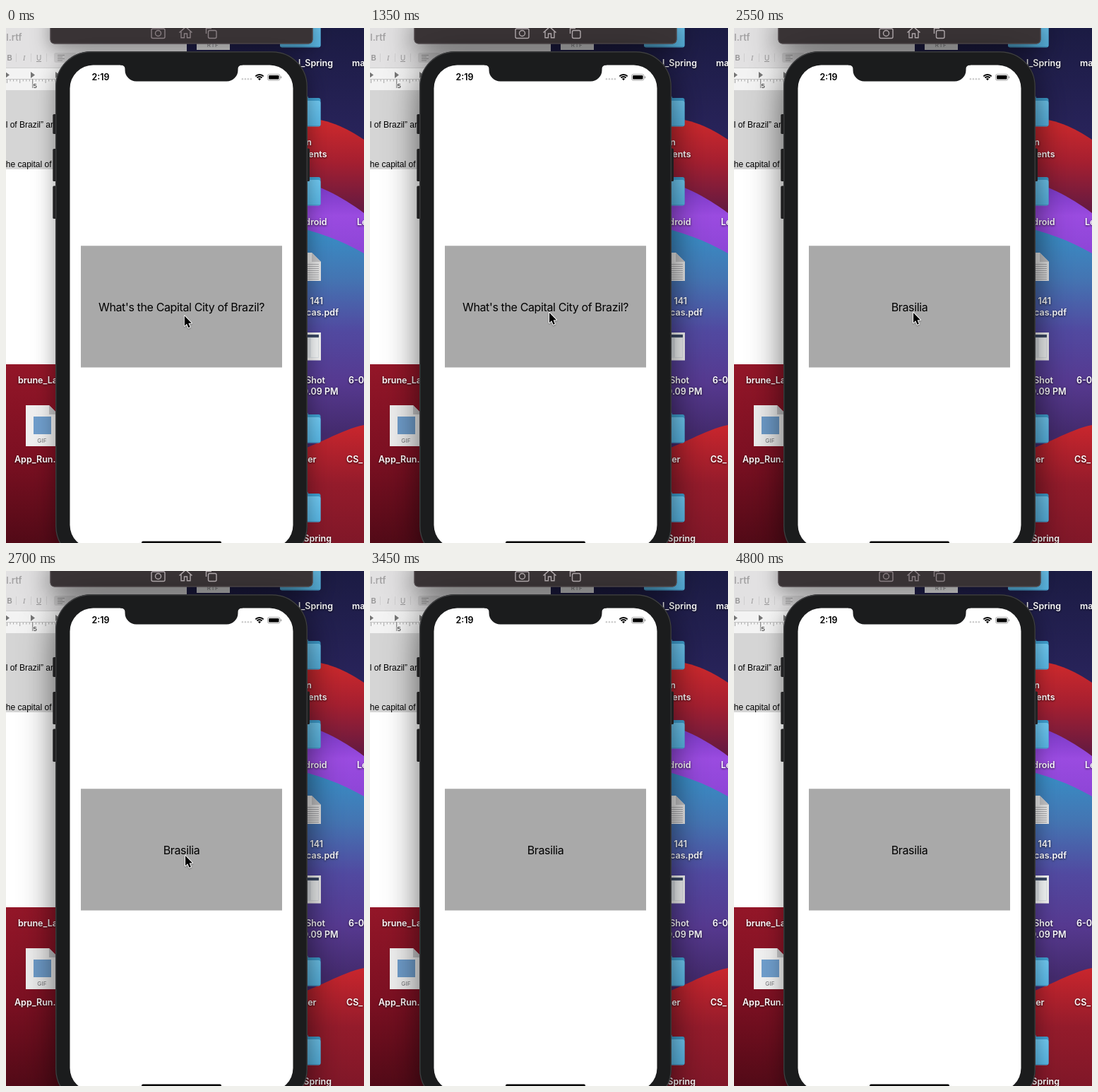
Write an HTML page with a canvas that moves like this. It is 507 by 729 pixels and loops after 4900 ms.

```html
<!DOCTYPE html>
<html lang="en">
<head>
<meta charset="utf-8">
<title>Flashcard app on a desktop</title>
<style>
html, body { margin: 0; width: 100%; height: 100%; overflow: hidden; background: #222; }
canvas { display: block; width: 507px; height: 729px; }
</style>
</head>
<body>
<canvas id="stage" width="507" height="729"></canvas>
<script>
const ctx = document.getElementById('stage').getContext('2d');
const LOOP = 4900;
const UI = 'Inter, "Open Sans", sans-serif';
const DOC = '"Liberation Sans", sans-serif';

function rect(x, y, w, h, fill) {
  ctx.fillStyle = fill;
  ctx.fillRect(x, y, w, h);
}

function round(x, y, w, h, r, fill) {
  ctx.beginPath();
  ctx.roundRect(x, y, w, h, r);
  ctx.fillStyle = fill;
  ctx.fill();
}

function poly(points, fill) {
  ctx.beginPath();
  points.forEach(([x, y]) => ctx.lineTo(x, y));
  ctx.closePath();
  ctx.fillStyle = fill;
  ctx.fill();
}

function line(points, color, width = 1) {
  ctx.beginPath();
  points.forEach(([x, y], i) => i ? ctx.lineTo(x, y) : ctx.moveTo(x, y));
  ctx.strokeStyle = color;
  ctx.lineWidth = width;
  ctx.stroke();
}

function fade(y0, y1, ...colors) {
  const g = ctx.createLinearGradient(0, y0, 0, y1);
  colors.forEach((c, i) => g.addColorStop(i / (colors.length - 1), c));
  return g;
}

function text(str, x, y, font, fill, align = 'left', spacing = 0) {
  ctx.font = font;
  ctx.textAlign = align;
  ctx.letterSpacing = spacing + 'px';
  ctx.fillStyle = fill;
  ctx.fillText(str, x, y);
  ctx.letterSpacing = '0px';
}

function shadow(color, blur, dy) {
  ctx.shadowColor = color;
  ctx.shadowBlur = blur;
  ctx.shadowOffsetY = dy;
}

// A wallpaper layer: everything below a curved upper edge.
function wave(x0, y0, c1x, c1y, c2x, c2y, x1, y1, fill) {
  ctx.beginPath();
  ctx.moveTo(x0, y0);
  ctx.bezierCurveTo(c1x, c1y, c2x, c2y, x1, y1);
  ctx.lineTo(x1, 729);
  ctx.lineTo(x0, 729);
  ctx.closePath();
  ctx.fillStyle = fill;
  ctx.fill();
}

function wallpaper() {
  rect(0, 0, 507, 729, fade(0, 150, '#1b1b43', '#28235a'));
  wave(400, 127, 450, 124, 480, 140, 507, 158, fade(125, 255, '#d12a2c', '#a51f30', '#671a40'));
  wave(400, 212, 440, 220, 475, 238, 507, 262, fade(212, 320, '#7034bd', '#9a4be0', '#8d45d6'));
  wave(400, 280, 440, 287, 475, 301, 507, 319, fade(283, 575, '#378fc6', '#4474b2', '#5149a0', '#563990', '#432a6c'));
  wave(400, 603, 440, 592, 475, 568, 507, 562, fade(562, 729, '#c9262d', '#941b2b', '#801728'));
  rect(0, 470, 250, 259, fade(476, 729, '#931628', '#7d1022', '#520a17'));
}

function folder(y) {
  round(388, y, 40, 12, 3, '#3c9bcb');
  round(388, y + 3, 57.5, 40, 3, '#3f9fd0');
  round(388, y + 7, 57.5, 36.5, 3, fade(y + 7, y + 43, '#70c9f2', '#58b6e4'));
  rect(389, y + 42, 56, 1, '#459fcd');
}

function page(x, y, w, h, fold, fill) {
  poly([[x, y], [x + w - fold, y], [x + w, y + fold], [x + w, y + h], [x, y + h]], fill);
  poly([[x + w - fold, y], [x + w, y + fold], [x + w - fold, y + fold]], '#c4c4c6');
}

function label(str, x, y, align = 'right') {
  shadow('rgba(0,0,0,.75)', 3, 1);
  text(str, x, y + 4.5, '600 12.5px ' + UI, '#fff', align);
  shadow('transparent', 0, 0);
}

function icons() {
  [-16, 96, 208, 544, 656].forEach(folder);

  page(270, -28, 47, 59, 12, '#e2e2e2');
  text('RTF', 293, 27, '8px ' + UI, '#77777a', 'center', 0.5);

  page(402, 318, 44, 40, 13, '#e6e6e6');
  for (let y = 334; y < 356; y += 3) rect(406, y, 37, 1, '#aaaaad');

  rect(388, 431, 58, 39.5, '#f4f4f4');
  rect(391, 434, 52, 33, '#dfe4e8');
  rect(391, 434, 52, 4, '#3c4a66');
  rect(432, 439, 10, 27, '#f5f7f8');

  page(28, 534, 46, 58, 13, '#efefef');
  rect(39, 550, 25, 25, '#6f9dcb');
  text('GIF', 51, 587, '8px ' + UI, '#6d6d70', 'center', 0.3);

  label('l_Spring', 463, 49);
  label('map', 490, 49, 'left');
  label('n', 433, 161);
  label('ents', 454.5, 178);
  label('droid', 454.5, 274);
  label('Le', 497, 274, 'left');
  label('141', 449, 386);
  label('cas.pdf', 471, 402);
  label('Shot', 452, 498);
  label('0.09 PM', 470.5, 514);
  label('6-0', 485, 498, 'left');
  label('ter', 439.5, 610);
  label('CS_', 482, 610, 'left');
  label('Spring', 461, 722);
  label('brune_Lab', 17, 498, 'left');
  label('App_Run.gif', 12, 610, 'left');
}

function editor() {
  rect(0, 0, 256, 476, '#fff');
  rect(0, 0, 256, 56, '#e2e1e2');
  rect(0, 56, 256, 32, '#f3f3f3');
  rect(0, 56, 256, 1, '#cfcfcf');
  rect(0, 72, 256, 1, '#c4c4c4');
  rect(0, 88, 256, 112, '#d5d5d5');
  text('l.rtf', 22.5, 17.5, '600 13px ' + UI, '#a3a2a3', 'right');

  text('B', 1.5, 45.5, 'bold 10px ' + DOC, '#979697');
  text('I', 24, 45.5, 'italic 10px "Liberation Serif", serif', '#979697');
  text('U', 43, 45.5, '10px ' + DOC, '#979697');
  line([[43, 47.5], [50, 47.5]], '#979697');
  [14.5, 35.5, 57.5].forEach(x => line([[x, 36], [x, 48]], '#d0cfd0'));
  round(68, 35, 32, 14, 3, '#cfcecf');
  for (let i = 0; i < 4; i++) rect(73, 38 + i * 2.5, i % 2 ? 7 : 10, 1, '#9a999a');

  for (let i = 0; i < 16; i++) {
    const x = 1.5 + i * 4.55;
    line([[x, 73], [x, i % 4 ? 75.5 : 78]], '#a5a5a5');
  }
  line([[37.5, 72], [37.5, 85]], '#8c8c8c');
  text('5', 38.5, 84.5, '9.5px ' + DOC, '#222');
  [-1, 35, 70].forEach(x => poly([[x, 62], [x + 6, 66.5], [x, 71]], '#757575'));

  text('l of Brazil” ar', 67, 141, '12px ' + DOC, '#000', 'right');
  text('the capital of', 64.5, 197, '12px ' + DOC, '#000', 'right');
}

function toolbar(active) {
  shadow(`rgba(0,0,0,${active ? 0.55 : 0.4})`, active ? 40 : 26, active ? 12 : 7);
  round(62.5, -20, 372, 42.5, 6, '#393335');
  shadow('transparent', 0, 0);
  ctx.beginPath();
  ctx.roundRect(63, -20, 371, 42, 6);
  ctx.strokeStyle = '#585154';
  ctx.lineWidth = 1;
  ctx.stroke();

  const ink = active ? '#b3abae' : '#897f83';
  ctx.strokeStyle = ink;
  ctx.lineWidth = 1.4;
  ctx.beginPath();
  ctx.roundRect(206, 1, 19, 13.5, 2);
  ctx.moveTo(219.5, 7.5);
  ctx.arc(215.5, 7.5, 4, 0, 7);
  ctx.stroke();
  line([[245.5, 6.5], [254.5, -1.5], [263.5, 6.5]], ink, 1.5);
  line([[248, 5], [248, 13.8], [252.5, 13.8], [252.5, 8], [256.5, 8], [256.5, 13.8], [261, 13.8], [261, 5]], ink, 1.4);
  ctx.beginPath();
  ctx.roundRect(286.5, 3.5, 11.5, 11, 2);
  ctx.stroke();
  line([[283.5, 8], [283.5, 0.5], [291, 0.5]], ink, 1.4);
}

function notch() {
  ctx.beginPath();
  ctx.moveTo(162, 51);
  ctx.lineTo(162, 52.5);
  ctx.quadraticCurveTo(168.5, 52.5, 168.5, 58);
  ctx.arcTo(168.5, 75.5, 190, 75.5, 16);
  ctx.arcTo(328.5, 75.5, 328.5, 58, 16);
  ctx.lineTo(328.5, 58);
  ctx.quadraticCurveTo(328.5, 52.5, 335, 52.5);
  ctx.lineTo(335, 51);
  ctx.closePath();
  ctx.fillStyle = '#1b1c1d';
  ctx.fill();
}

function statusBar() {
  text('2:19', 134, 74.3, '600 12.5px ' + UI, '#000', 'center');
  for (let i = 0; i < 4; i++) round(333.7 + i * 4, 71, 2.4, 2.4, 1.2, '#c9c9c9');

  for (const [r, w] of [[8, 2], [5, 2]]) {
    ctx.beginPath();
    ctx.arc(359, 74, r, -Math.PI * 0.75, -Math.PI * 0.25);
    ctx.strokeStyle = '#000';
    ctx.lineWidth = w;
    ctx.stroke();
  }
  ctx.beginPath();
  ctx.moveTo(359, 74.3);
  ctx.arc(359, 74, 2.8, -Math.PI * 0.75, -Math.PI * 0.25);
  ctx.fillStyle = '#000';
  ctx.fill();

  ctx.beginPath();
  ctx.roundRect(370.5, 65.5, 17.5, 8.5, 2.4);
  ctx.strokeStyle = '#999';
  ctx.lineWidth = 0.9;
  ctx.stroke();
  round(372, 67, 14.5, 5.5, 1.2, '#000');
  round(388.8, 68.3, 1.4, 3, 0.7, '#999');
}

function phone(active) {
  for (const [y, h] of [[122, 28], [171, 46], [223.5, 46.5]]) round(66.3, y, 6, h, 1.5, '#2a2a2c');
  round(424, 170.5, 6, 46.5, 1.5, '#2a2a2c');
  shadow(`rgba(0,0,0,${active ? 0.6 : 0.4})`, active ? 48 : 30, active ? 14 : 8);
  round(70, 33, 357, 722, 50, '#1b1c1d');
  shadow('transparent', 0, 0);
  ctx.beginPath();
  ctx.roundRect(70.8, 33.8, 355.4, 720.4, 49);
  ctx.strokeStyle = '#404143';
  ctx.lineWidth = 1.2;
  ctx.stroke();
  round(90.5, 52.5, 316, 684, 33, '#fff');
  notch();
  statusBar();
  round(192, 726.5, 113, 4, 2, '#000');
}

function cursor(x, y) {
  ctx.save();
  ctx.translate(x, y);
  ctx.beginPath();
  [[0, 0], [0, 14.2], [3.2, 11.2], [5.6, 16.8], [7.9, 15.8], [5.6, 10.4], [10, 10.2]]
    .forEach(([px, py]) => ctx.lineTo(px, py));
  ctx.closePath();
  shadow('rgba(0,0,0,.35)', 2, 1);
  ctx.strokeStyle = '#fff';
  ctx.lineWidth = 2;
  ctx.lineJoin = 'round';
  ctx.stroke();
  shadow('transparent', 0, 0);
  ctx.fillStyle = '#000';
  ctx.fill();
  ctx.restore();
}

function pointer(t) {
  if (t < 150) return [252.8, 407.5];
  if (t < 3300) return [254, 403];
  if (t < 3450) return [316, 523];
  return null;
}

function draw(active, message, tip) {
  wallpaper();
  icons();
  editor();
  toolbar(active);
  phone(active);
  rect(106, 308.3, 285, 172.2, '#a9a9a9');
  text(message, 248.5, 400.7, '16px ' + UI, '#000', 'center', -0.37);
  if (tip) cursor(...tip);
}

let last = '';
function tick(now) {
  const t = now % LOOP;
  const active = t >= 1350 && t < 4800;
  const message = t < 1500 ? "What's the Capital City of Brazil?" : 'Brasilia';
  const tip = pointer(t);
  const state = [active, message, tip].join();
  if (state !== last) {
    draw(active, message, tip);
    last = state;
  }
  requestAnimationFrame(tick);
}
tick(0);
</script>
</body>
</html>
```
